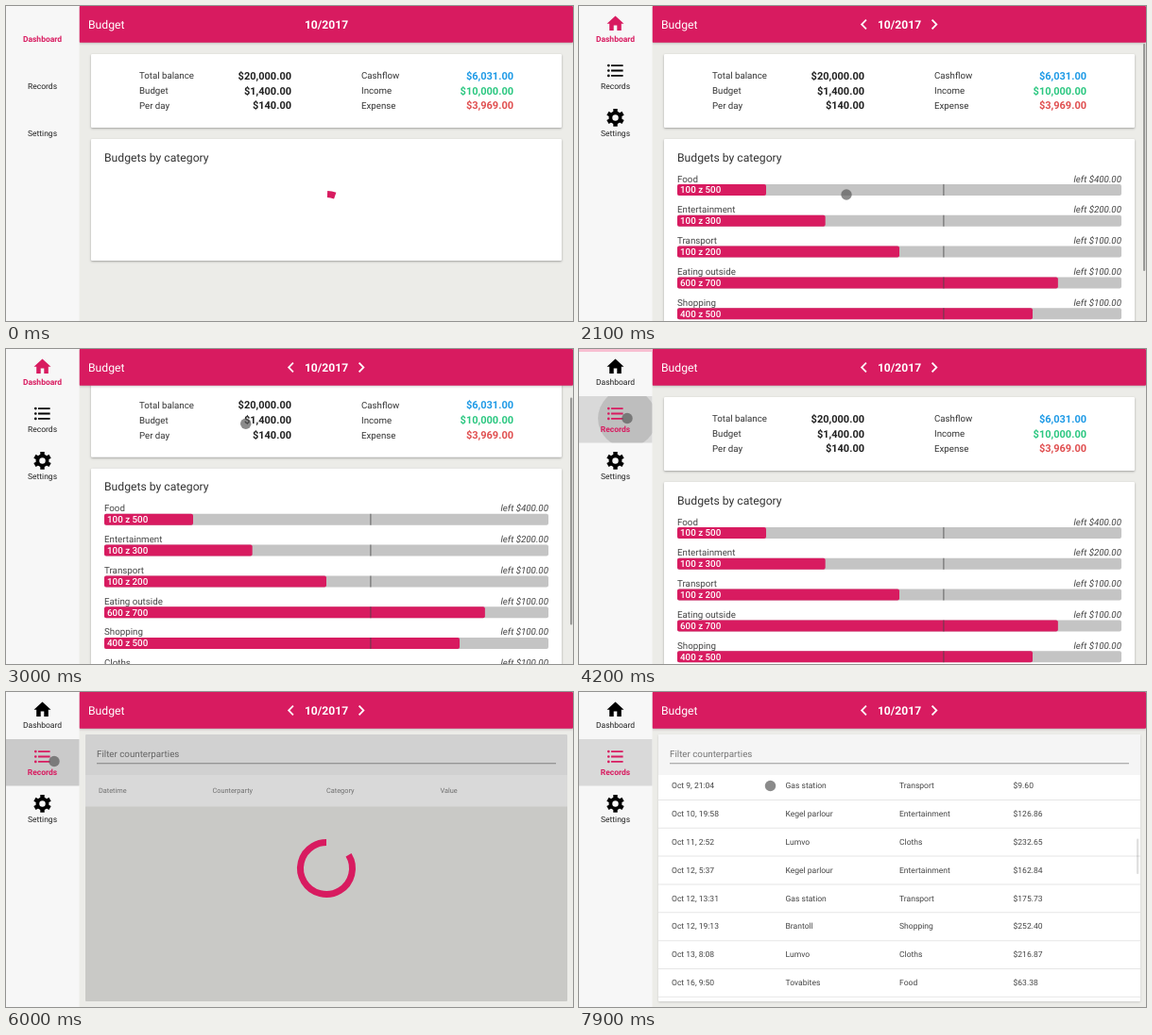
An HTML page with a canvas that plays this animation: 600x334 px, repeating every 8 s.

```html
<!DOCTYPE html>
<html lang="en">
<head>
<meta charset="utf-8">
<title>Budget</title>
<style>
html, body { margin: 0; width: 100%; height: 100%; overflow: hidden; background: #ecece8; }
canvas { display: block; width: 600px; height: 334px; }
</style>
</head>
<body>
<canvas id="stage"></canvas>
<script>
const LOOP = 8000, STEP = 100;
const PINK = '#d81b60', INK = '#212121', BG = '#ecece8';
const SIDE = 77.5;
const HOME = 'M10 20v-6h4v6h5v-8h3L12 3 2 12h3v8z';
const LIST = [6, 12, 18].map(y =>
  `M2.5 ${y}a1.5 1.5 0 0 1 3 0a1.5 1.5 0 0 1-3 0M7 ${y - 1}h14v2H7z`).join('');
const PREV = 'M15.4 7.4L14 6l-6 6 6 6 1.4-1.4L10.8 12z';
const NEXT = 'M10 6L8.6 7.4l4.6 4.6-4.6 4.6L10 18l6-6z';

const summary = [
  ['Total balance', '$20,000.00', 'Cashflow', '$6,031.00', '#1e9ae6'],
  ['Budget', '$1,400.00', 'Income', '$10,000.00', '#2bc780'],
  ['Per day', '$140.00', 'Expense', '$3,969.00', '#e04f50']
];
const budgets = [
  ['Food', 100, 500], ['Entertainment', 100, 300], ['Transport', 100, 200],
  ['Eating outside', 600, 700], ['Shopping', 400, 500], ['Cloths', 100, 200]
];
const shops = {
  c: ['Lumvo', 'Cloths'], g: ['Gas station', 'Transport'], s: ['Brantoll', 'Shopping'],
  e: ['Kegel parlour', 'Entertainment'], f: ['Tovabites', 'Food']
};
const records = `4, 4:05|c|19.37
5, 19:05|g|98.10
5, 20:09|g|69.46
6, 6:20|s|129.83
6, 8:29|s|190.46
6, 19:25|g|274.23
7, 15:03|g|268.03
7, 18:40|f|42.15
8, 9:12|s|87.60
8, 13:27|c|154.28
8, 20:51|e|73.90
9, 7:36|g|118.42
9, 12:18|f|35.74
9, 21:04|g|9.60
10, 19:58|e|126.86
11, 2:52|c|232.65
12, 5:37|e|162.84
12, 13:31|g|175.73
12, 19:13|s|252.40
13, 8:08|c|216.87
16, 9:50|f|63.38
16, 14:22|g|81.05`.split('\n').map(line => {
  const [time, shop, value] = line.split('|');
  return ['Oct ' + time, ...shops[shop], '$' + value];
});
const columns = [98, 218.5, 339, 459.5];

// Touch point: time, x, y
const touchPath = [
  [2100, 283, 200], [2300, 272.5, 119], [2550, 263, 28], [2750, 260, 28],
  [3150, 250, 110], [3800, 51, 73.5], [6500, 51, 73.5], [6700, 311.5, 153.5],
  [6850, 290, 22], [7400, 218, 80], [7700, 202.5, 99.5]
];

const canvas = document.getElementById('stage');
const ctx = canvas.getContext('2d');
const dpr = window.devicePixelRatio || 1;
canvas.width = 600 * dpr;
canvas.height = 334 * dpr;
ctx.textRendering = 'geometricPrecision';

const clamp = (v, lo = 0, hi = 1) => Math.min(hi, Math.max(lo, v));
const ramp = (t, a, b) => clamp((t - a) / (b - a));
const smooth = x => x * x * (3 - 2 * x);
const easeOut = x => 1 - (1 - x) ** 2;

// The page follows the finger; the table is also flung on after release
const pageScroll = t => 65 * (ramp(t, 2100, 2260) - ramp(t, 2750, 3070));
const tableScroll = t => 131 * ramp(t, 6700, 6850) + 294 * easeOut(ramp(t, 6850, 7400));

function follow(keys, t) {
  const i = keys.findIndex(k => k[0] > t);
  if (i < 0) return keys[keys.length - 1].slice(1);
  const [a, b] = [keys[Math.max(i - 1, 0)], keys[i]];
  const p = ramp(t, a[0], b[0]);
  return [a[1] + (b[1] - a[1]) * p, a[2] + (b[2] - a[2]) * p];
}

function text(str, x, y, size, color = INK, style = '400', align = 'left') {
  ctx.font = `${style} ${size}px Roboto, sans-serif`;
  ctx.fillStyle = color;
  ctx.textAlign = align;
  ctx.fillText(str, x, y);
}

function rect(x, y, w, h, color, r = 0) {
  ctx.fillStyle = color;
  ctx.beginPath();
  ctx.roundRect(x, y, w, h, r);
  ctx.fill();
}

function disc(x, y, r, color) {
  ctx.fillStyle = color;
  ctx.beginPath();
  ctx.arc(x, y, r, 0, 7);
  ctx.fill();
}

function raised(x, y, w, h, color, shade) {
  ctx.save();
  ctx.shadowColor = `rgba(0,0,0,${shade})`;
  ctx.shadowBlur = 2.5 * dpr;
  ctx.shadowOffsetY = dpr;
  rect(x, y, w, h, color, 1);
  ctx.restore();
}

function clipped(x, y, w, h, draw) {
  ctx.save();
  ctx.beginPath();
  ctx.rect(x, y, w, h);
  ctx.clip();
  draw();
  ctx.restore();
}

function icon(path, x, y, color) {
  ctx.save();
  ctx.translate(x, y);
  ctx.scale(0.9, 0.9);
  ctx.translate(-12, -12);
  ctx.fillStyle = color;
  ctx.fill(new Path2D(path));
  ctx.restore();
}

function gear(x, y) {
  ctx.save();
  ctx.translate(x, y);
  ctx.scale(0.93, 0.93);
  ctx.strokeStyle = ctx.fillStyle = '#000';
  ctx.lineWidth = 4;
  ctx.beginPath();
  ctx.arc(0, 0, 5.5, 0, 7);
  ctx.stroke();
  for (let i = 0; i < 6; i++) {
    ctx.rotate(Math.PI / 3);
    ctx.fillRect(-2.4, -10, 4.8, 4);
  }
  ctx.restore();
}

// Arc whose head runs ahead of its tail, clockwise from the top
function spinner(y, elapsed) {
  const phase = clamp(90 + 0.78 * Math.min(elapsed, 1000), 0, 1400);
  const grow = smooth(ramp(phase, 0, 700)), chase = smooth(ramp(phase, 700, 1400));
  const tail = 15 * grow + 105 * chase;
  const head = Math.min(tail + 1 + 99 * grow, 36 * Math.PI);
  if (tail >= head) return;
  ctx.strokeStyle = PINK;
  ctx.lineWidth = 7;
  ctx.beginPath();
  ctx.arc(339, y, 27.5, tail / 18 - Math.PI / 2, head / 18 - Math.PI / 2);
  ctx.stroke();
}

function dashboard(t) {
  const loaded = t >= 1200, scroll = pageScroll(t);
  ctx.save();
  ctx.translate(0, -scroll);
  raised(90, 51, 498, 78, '#fff', 0.32);
  summary.forEach(([name, value, name2, value2, color], i) => {
    const y = 77.2 + i * 15.8;
    text(name, 141, y, 9.7, '#333');
    text(value, 302, y + 0.5, 11, INK, '700', 'right');
    text(name2, 376, y, 9.7, '#333');
    text(value2, 537, y + 0.5, 11, color, '700', 'right');
  });
  raised(90, 141, 498, loaded ? 247 : 129, '#fff', 0.32);
  text('Budgets by category', 104, 164.5, 12.2, '#333');
  if (loaded) budgets.forEach(([name, spent, total], i) => {
    const y = 189 + i * 32.8;
    text(name, 104, y - 2.5, 9.75, '#444');
    text(`left $${total - spent}.00`, 574, y - 2.5, 9.75, '#444', 'italic 400', 'right');
    rect(104, y, 470, 12, '#c4c4c4', 2);
    rect(104, y, 470 * spent / total, 12, PINK, 2);
    rect(385.4, y, 1, 12, 'rgba(70,70,70,.8)');
    text(`${spent} z ${total}`, 107, y + 9.4, 9.8, '#fff', '500');
  });
  else spinner(227, t);
  ctx.restore();
  if (loaded) {
    const fade = t < 2100 ? ramp(t, 1300, 1800) : ramp(t, 3300, 3800);
    rect(597, 40 + scroll * 0.81, 2.2, 241, `rgba(0,0,0,${0.35 * (1 - fade)})`, 1);
  }
}

function recordList(t) {
  const loaded = t >= 6300, scroll = tableScroll(t);
  if (loaded) raised(84, 45, 510, 283, '#fff', 0.14);
  rect(84, 45, 510, 43, '#f5f5f5');
  text('Filter counterparties', 96, 69.3, 9.75, '#757575');
  rect(96, 75.3, 486, 0.9, '#999');
  clipped(84, 88, 510, 240, () => {
    const top = 88 - scroll;
    rect(84, top, 510, 33.5, '#fff');
    ['Datetime', 'Counterparty', 'Category', 'Value'].forEach((s, i) =>
      text(s, columns[i], top + 19.1, 7.35, '#808080'));
    if (!loaded) return;
    records.forEach((cells, i) => {
      const y = top + 33 + i * 29.85;
      rect(84, y, 510, 1, '#e6e6e6');
      cells.forEach((s, n) => text(s, columns[n], y + 18.1, 8.55, '#444'));
    });
    const alpha = 0.3 - 0.18 * ramp(t, 7400, 7900);
    rect(590, 90 + scroll * 0.154, 2.3, 37.5, `rgba(0,0,0,${alpha})`, 1);
  });
  if (!loaded) {
    rect(84, 45, 510, 283, 'rgba(0,0,0,.15)', 1);
    spinner(187, t - 5120);
  }
}

function header(t) {
  raised(SIDE, 0, 600 - SIDE, 38.7, PINK, 0.2);
  text('Budget', 87, 24, 12.2, '#fff');
  text('10/2017', 339, 24, 12.1, '#fff', '700', 'center');
  if ((t >= 900 && t < 5000) || t >= 6000) {
    icon(PREV, 301.5, 19.5, '#fff');
    icon(NEXT, 376, 19.5, '#fff');
  }
}

function sidebar(t) {
  const active = t < 4000 ? 0 : 1, mid = 38.5;
  rect(0, 0, SIDE, 334, '#f7f7f7');
  if (active) rect(0, 50, SIDE, 49.5, '#d9d9d9');
  if (t >= 3900) clipped(0, 50, SIDE, 49.5, () => {
    const alpha = 0.125 * (1 - ramp(t, 5600, 6500));
    disc(51, 73.5, 75 * ramp(t, 3850, 4700), `rgba(0,0,0,${alpha})`);
  });
  if (t >= 4000 && t < 4900) rect(0, 0, SIDE, 3, '#f8bfd2');
  ['Dashboard', 'Records', 'Settings'].forEach((s, i) => {
    const on = i === active;
    text(s, mid, 38.2 + i * 49.9, 8.5, on ? PINK : INK, on ? '700' : '400', 'center');
  });
  if (t < 400) return;
  icon(HOME, mid, 18.7, active ? '#000' : PINK);
  icon(LIST, mid, 68.5, active ? PINK : '#000');
  gear(mid, 118.4);
}

function draw(t) {
  ctx.setTransform(dpr, 0, 0, dpr, 0, 0);
  rect(0, 0, 600, 334, BG);
  (t < 5000 ? dashboard : recordList)(t);
  header(t);
  sidebar(t);
  if (t >= 2100) disc(...follow(touchPath, t), 5.7, 'rgba(90,90,90,.7)');
}

const start = performance.now();
function tick() {
  const t = (performance.now() - start) % LOOP;
  draw(Math.floor(t / STEP) * STEP);
  requestAnimationFrame(tick);
}
tick();
</script>
</body>
</html>
```
